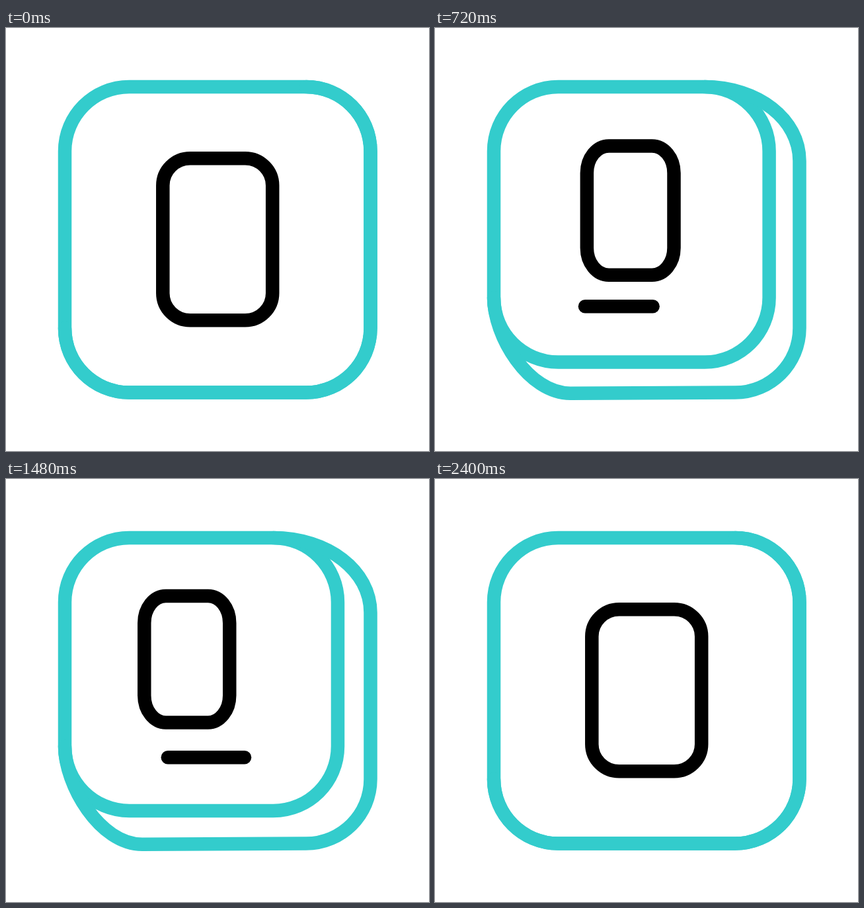
An HTML page with a canvas that plays this animation: 640 px wide and 640 px high, repeating every 2.48 s.

```html
<!DOCTYPE html>
<html lang="en">
<head>
<meta charset="utf-8">
<title>Sliding tile</title>
<style>
html, body { margin: 0; width: 100%; height: 100%; overflow: hidden; background: #fff; }
canvas { display: block; width: 640px; height: 640px; }
</style>
</head>
<body>
<canvas id="stage" width="640" height="640"></canvas>
<script>
const ctx = document.getElementById('stage').getContext('2d');
const LOOP = 2480, STEP = 40;
const TEAL = '#33cccc', BLACK = '#000';
const K = 0.5523;

const clamp = v => Math.min(1, Math.max(0, v));
const span = (t, from, to) => clamp((t - from) / (to - from));
const smooth = x => x * x * (3 - 2 * x);
const mix = (a, b, p) => a + (b - a) * p;

// cubic-bezier(.55, 0, .45, 1)
function ease(x) {
  let lo = 0, hi = 1;
  for (let i = 0; i < 24; i++) {
    const s = (lo + hi) / 2, r = 1 - s;
    if (1.65 * s * r * r + 1.35 * s * s * r + s * s * s < x) lo = s;
    else hi = s;
  }
  return smooth((lo + hi) / 2);
}

// Rectangle with elliptical corners
function roundBox(l, t, r, b, rx, ry) {
  const hx = rx * (1 - K), hy = ry * (1 - K);
  ctx.beginPath();
  ctx.moveTo(l + rx, t);
  ctx.lineTo(r - rx, t);
  ctx.bezierCurveTo(r - hx, t, r, t + hy, r, t + ry);
  ctx.lineTo(r, b - ry);
  ctx.bezierCurveTo(r, b - hy, r - hx, b, r - rx, b);
  ctx.lineTo(l + rx, b);
  ctx.bezierCurveTo(l + hx, b, l, b - hy, l, b - ry);
  ctx.lineTo(l, t + ry);
  ctx.bezierCurveTo(l, t + hy, l + hx, t, l + rx, t);
  ctx.closePath();
  ctx.stroke();
}

function drawTile(p) {
  const near = 89, far = 551.5, r = 97.5;
  const front = far - 50 * p, turn = front - r;
  const low = far + 1.3 * p, rightY = near + r + 16 * p, lowX = near + r + 20 * p;
  ctx.strokeStyle = TEAL;
  roundBox(near, near, front, front, r, r);

  ctx.beginPath();
  ctx.moveTo(turn, near);
  ctx.bezierCurveTo(mix(turn, far, K + 0.01 * p), near,
    far, mix(rightY, near, K + 0.01 * p), far, rightY);
  ctx.lineTo(far, far - r);
  ctx.bezierCurveTo(far, far - r * (1 - K), far - r * (1 - K), far, far - r, far);
  ctx.lineTo(lowX, low);
  ctx.bezierCurveTo(mix(lowX, near, K), low, near, turn + r * K + 4 * p, near, turn);
  ctx.stroke();
}

function drawPill(p, shift) {
  ctx.strokeStyle = BLACK;
  roundBox(237.3 - 8.1 * p + shift, 197.3 - 20.6 * p,
    403.2 - 45.4 * p + shift, 442.3 - 74.6 * p, mix(41.3, 32.5, p), 41);
}

function drawBar(from, to) {
  if (to <= from) return;
  ctx.strokeStyle = BLACK;
  ctx.beginPath();
  ctx.moveTo(mix(227, 361, from), 421.2);
  ctx.lineTo(mix(227, 361, to), 421.2);
  ctx.stroke();
}

function draw(t) {
  const lift = ease(span(t, 88, 916)) - ease(span(t, 1405, 2255));
  const shift = 70 * (smooth(span(t, 805, 1060))
    - 2 * smooth(span(t, 1060, 1315))
    + smooth(span(t, 1315, 1570)));

  ctx.fillStyle = '#fff';
  ctx.fillRect(0, 0, 640, 640);
  ctx.lineWidth = 20.5;
  ctx.lineCap = 'round';
  drawTile(lift);
  drawPill(lift, shift);
  drawBar(smooth(span(t, 1400, 1750)), smooth(span(t, 480, 830)));
}

const start = performance.now();
function tick() {
  const t = (performance.now() - start) % LOOP;
  draw(Math.floor(t / STEP) * STEP);
  requestAnimationFrame(tick);
}
tick();
</script>
</body>
</html>
```
